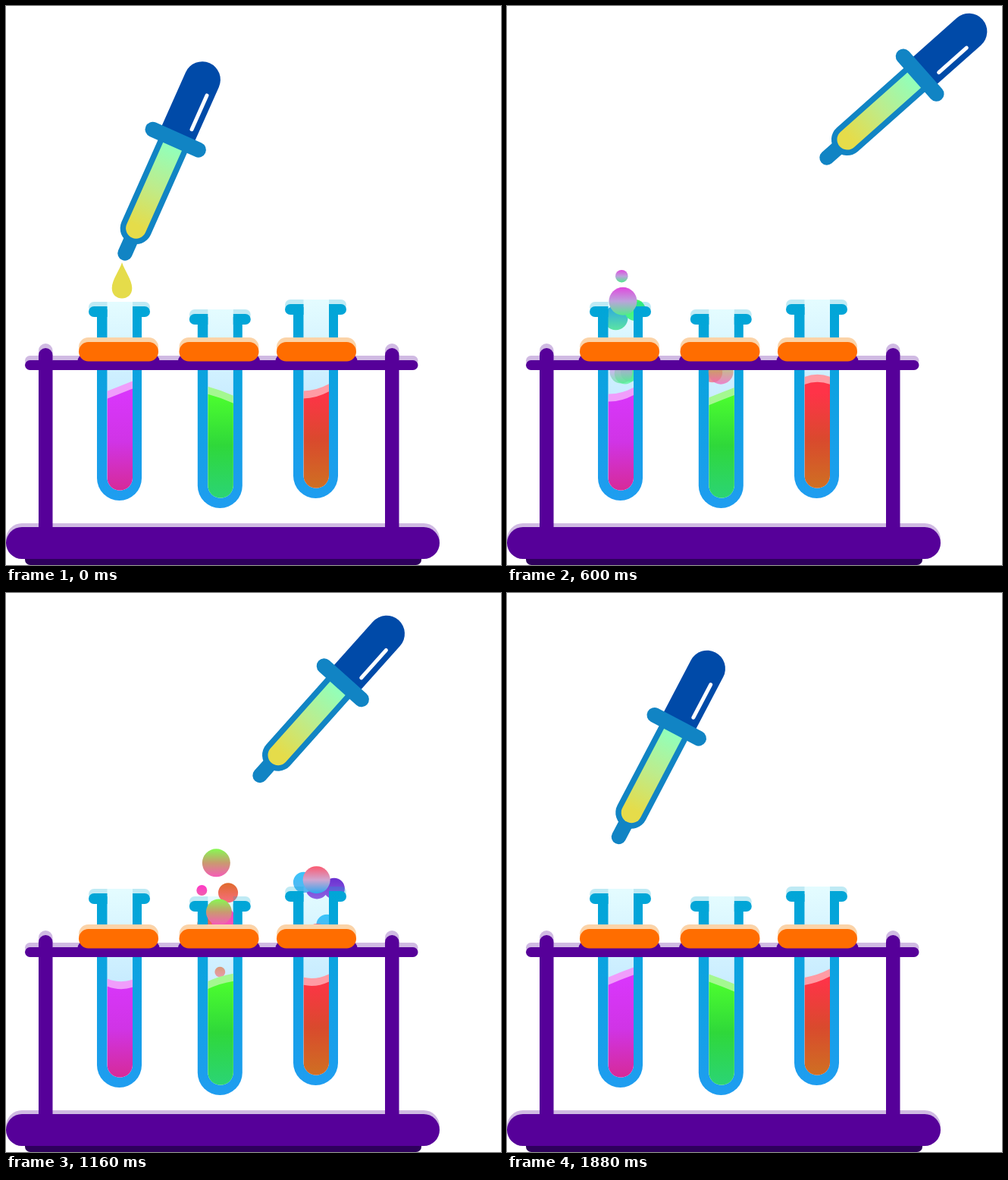
An HTML page with a canvas for the animation above (1920 ms loop, 653 by 737 pixels).

```html
<!DOCTYPE html>
<html lang="en">
<head>
<meta charset="utf-8">
<title>Test tubes</title>
<style>
html, body { margin: 0; width: 100%; height: 100%; overflow: hidden; background: #fff; }
canvas { display: block; }
</style>
</head>
<body>
<canvas id="stage" width="653" height="737"></canvas>
<script>
const ctx = document.getElementById('stage').getContext('2d');
const LOOP = 1920, STEP = 40, RAD = Math.PI / 180;
const PURPLE = '#560099', LILAC = '#d0bae3', BLUE = '#1184c4', YELLOW = '#e5dc4a';

// Dropper stops: time, tip x, tip y, angle in degrees
const stops = [
  [0, 157, 326, 24], [360, 283.5, 279.5, 50.2], [600, 422, 200, 48.4], [740, 423, 272, 35],
  [1000, 424, 277, 31.5], [1160, 335, 240.5, 41.8], [1480, 182, 147.5, 68.3], [1880, 147.5, 321.5, 27.7]
];

// Times at which the sloshing changes pace; each tube has its phase in degrees there
const sloshTimes = [0, 360, 600, 1000, 1160, 1480];

const tubes = [
  { cx: 149.5, top: 390, clamp: 148.5, start: 0, flip: 1, rest: 501, slosh: 8,
    phase: [0, 45, -50, -90, -95, -220],
    band: '#f09dfb', liquid: ['#d936fb', '#d034e6', '#d62a98'],
    main: ['#e048de', '#bca2dc', '#52ea8c'], a: ['#40ff5c', '#4af290'], b: ['#2aa6e4', '#5ce4a2'] },
  { cx: 282.3, top: 400, clamp: 281, start: 400, flip: -1, rest: 510, slosh: 5,
    phase: [155, 30, 5, -35, 40, -45],
    band: '#a4f890', liquid: ['#4dff2e', '#2fd83a', '#2bd475'],
    main: ['#86fa52', '#c99a70', '#f65cb8'], a: ['#ff38c8', '#f060ac'], b: ['#e06a2c', '#f66e80'] },
  { cx: 408.5, top: 387, clamp: 409.5, start: 720, flip: 1, rest: 497, slosh: 8,
    phase: [-45, -200, -270, -480, -430, -290],
    band: '#ff9ba4', liquid: ['#ff3348', '#d94a2d', '#cf7022'],
    main: ['#fb5a70', '#d0a6d0', '#2ba6f0'], a: ['#38c4fa', '#5ab4f0'], b: ['#6a2fd0', '#8c62e2'] }
];

// Each bubble: colour, birth after the drop, life, x, sideways drift, radius
const bubbles = [
  ['b', 140, 440, 8, 24, 14], ['b', 210, 330, 3, -2, 15], ['b', 330, 540, 2, -16, 16],
  ['b', 550, 540, 12, 10, 14], ['b', 740, 315, 0, 0, 8],
  ['a', 100, 420, 6, -27, 18], ['a', 270, 560, 10, 16, 14], ['a', 560, 460, 9, -30, 16],
  ['main', 140, 520, 0, 2, 18], ['main', 350, 620, 1, 6, 18.5], ['main', 560, 540, 1, 1, 17]
].map(([kind, birth, life, x, drift, size]) => ({ kind, birth, life, x, drift, size }));

// Smooth loop through keys [time, ...values]; values change by `turn` on each round
function loopCurve(keys, turn = 0) {
  const n = keys.length;
  const at = i => {
    const round = Math.floor(i / n);
    return keys[i - round * n].map((v, c) => v + round * (c ? turn : LOOP));
  };
  return t => {
    const i = keys.findLastIndex(k => k[0] <= t);
    const [o, p, q, r] = [at(i - 1), at(i), at(i + 1), at(i + 2)];
    const span = q[0] - p[0], u = (t - p[0]) / span;
    return p.slice(1).map((v, j) => {
      const c = j + 1, d = q[c] - v;
      const m0 = (q[c] - o[c]) / (q[0] - o[0]) * span;
      const m1 = (r[c] - v) / (r[0] - p[0]) * span;
      return v + u * (m0 + u * (3 * d - 2 * m0 - m1 + u * (m0 + m1 - 2 * d)));
    });
  };
}

const dropperAt = loopCurve(stops);
for (const tube of tubes) {
  tube.phaseAt = loopCurve(sloshTimes.map((t, i) => [t, tube.phase[i]]), -360);
}

function fade(y0, y1, colors) {
  const g = ctx.createLinearGradient(0, y0, 0, y1);
  colors.forEach((c, i) => g.addColorStop(i / (colors.length - 1), c));
  return g;
}

function box(x, y, w, h, r, fill) {
  ctx.fillStyle = fill;
  ctx.beginPath();
  ctx.roundRect(x, y, w, h, r);
  ctx.fill();
}

// Bubbles slow down as they rise, gain strength, then shrink away
function drawBubbles(tube, kind, age) {
  for (const b of bubbles) {
    const u = (age - b.birth) / b.life;
    if (b.kind !== kind || u <= 0 || u >= 1) continue;
    const rise = kind === 'main' ? 0.29 * b.life : 125;
    const x = tube.cx + (b.x + b.drift * u) * tube.flip;
    const y = tube.top + 115 - rise * (1 - (1 - u) ** 2);
    const r = b.size * Math.min(1, 0.8 + u, 4 * (1 - u));
    ctx.globalAlpha = Math.min(1, 0.55 + 1.5 * u);
    ctx.fillStyle = fade(y - r, y + r, tube[kind]);
    ctx.beginPath();
    ctx.arc(x, y, r, 0, 7);
    ctx.fill();
  }
  ctx.globalAlpha = 1;
}

function drawDrop(tube, age) {
  if (age > 120) return;
  const [tipX, tipY] = dropperAt(tube.start);
  const from = tipY + 35;
  ctx.save();
  ctx.translate(tipX - 4, from + (500 - from) * (age / 120) ** 1.6);
  ctx.fillStyle = YELLOW;
  ctx.beginPath();
  ctx.moveTo(0, -23);
  ctx.bezierCurveTo(3, -13, 13.3, 0, 13.3, 11);
  ctx.bezierCurveTo(13.3, 29, -13.3, 29, -13.3, 11);
  ctx.bezierCurveTo(-13.3, 0, -3, -13, 0, -23);
  ctx.fill();
  ctx.restore();
}

function drawLiquid(tube, t, inner) {
  const phase = tube.phaseAt(t)[0] * RAD;
  const swell = -tube.slosh * Math.sin(phase), tilt = -13.5 * Math.cos(phase);
  const x = tube.cx - 16, level = tube.rest + swell, bottom = tube.top + 249;
  const fill = (y, color) => {
    ctx.fillStyle = color;
    ctx.beginPath();
    ctx.moveTo(x, y - tilt / 2);
    ctx.quadraticCurveTo(x + 17, y + 0.8 * swell, x + 34, y + tilt / 2);
    ctx.lineTo(x + 34, bottom);
    ctx.lineTo(x, bottom);
    ctx.fill();
  };
  ctx.save();
  ctx.clip(inner);
  fill(level, tube.band);
  fill(level + 10, fade(510, bottom, tube.liquid));
  ctx.restore();
}

function drawTube(tube, t) {
  const { cx, top } = tube;
  const age = (t - tube.start + LOOP) % LOOP;
  const inner = new Path2D();
  inner.roundRect(cx - 16, top, 33.5, 248.5, [0, 0, 16.5, 16.5]);
  ctx.fillStyle = fade(top, top + 120, ['#e4fcff', '#c8ecff']);
  ctx.fill(inner);

  drawBubbles(tube, 'b', age);
  drawBubbles(tube, 'a', age);

  const around = new Path2D(inner);
  around.rect(0, 0, 653, 737);
  const wall = fade(top, top + 262, ['#00a6d6', '#1f9df0']);
  ctx.save();
  ctx.clip(around, 'evenodd');
  box(cx - 40.5, top, 81, 14, 7, 'rgba(0,170,212,.25)');
  box(cx - 40.5, top + 6, 81, 14, 7, wall);
  box(cx - 29.5, top + 10, 59, 252, [0, 0, 29.5, 29.5], wall);
  ctx.restore();

  drawBubbles(tube, 'main', age);
  drawDrop(tube, age);
  drawLiquid(tube, t, inner);
}

function drawRack() {
  box(25, 461, 518.5, 13, 6.5, LILAC);
  box(25, 467, 518.5, 13, 6.5, PURPLE);
  for (const { clamp } of tubes) {
    box(clamp - 54, 460, 108, 18, 8, PURPLE);
    box(clamp - 52.5, 437, 105, 25, 12.5, '#fbd3a8');
    box(clamp - 52.5, 443, 105, 25.5, 12.7, '#ff6d00');
  }
  box(25, 722, 523, 15, [0, 0, 7, 7], '#2e005c');
  box(0, 682, 572, 42, 21, LILAC);
  for (const x of [43, 500]) {
    box(x, 445, 18.5, 30, 9.2, LILAC);
    box(x, 451, 18.5, 245, [9.2, 9.2, 0, 0], PURPLE);
  }
  box(0, 687, 572, 42, 21, PURPLE);
}

function drawDropper(t) {
  const [x, y, angle] = dropperAt(t);
  ctx.save();
  ctx.translate(x, y);
  ctx.rotate(angle * RAD);
  box(-24, -274.5, 48, 112, [24, 24, 0, 0], '#004aa8');
  box(11.5, -236.5, 5, 54, 2.5, '#fff');
  box(-9.7, -28, 19.4, 37.7, [0, 0, 9.7, 9.7], BLUE);
  box(-21, -160, 42, 145, [0, 0, 21, 21], BLUE);
  box(-13.5, -160, 27, 137.5, [0, 0, 13.5, 13.5], fade(-153, -40, ['#92ffba', '#bdec8c', YELLOW]));
  box(-43, -174, 86, 20, 10, BLUE);
  ctx.restore();
}

function draw(t) {
  ctx.fillStyle = '#fff';
  ctx.fillRect(0, 0, 653, 737);
  tubes.forEach(tube => drawTube(tube, t));
  drawRack();
  drawDropper(t);
}

const begin = performance.now();
function tick() {
  const t = (performance.now() - begin) % LOOP;
  draw(Math.floor(t / STEP) * STEP);
  requestAnimationFrame(tick);
}
tick();
</script>
</body>
</html>
```
